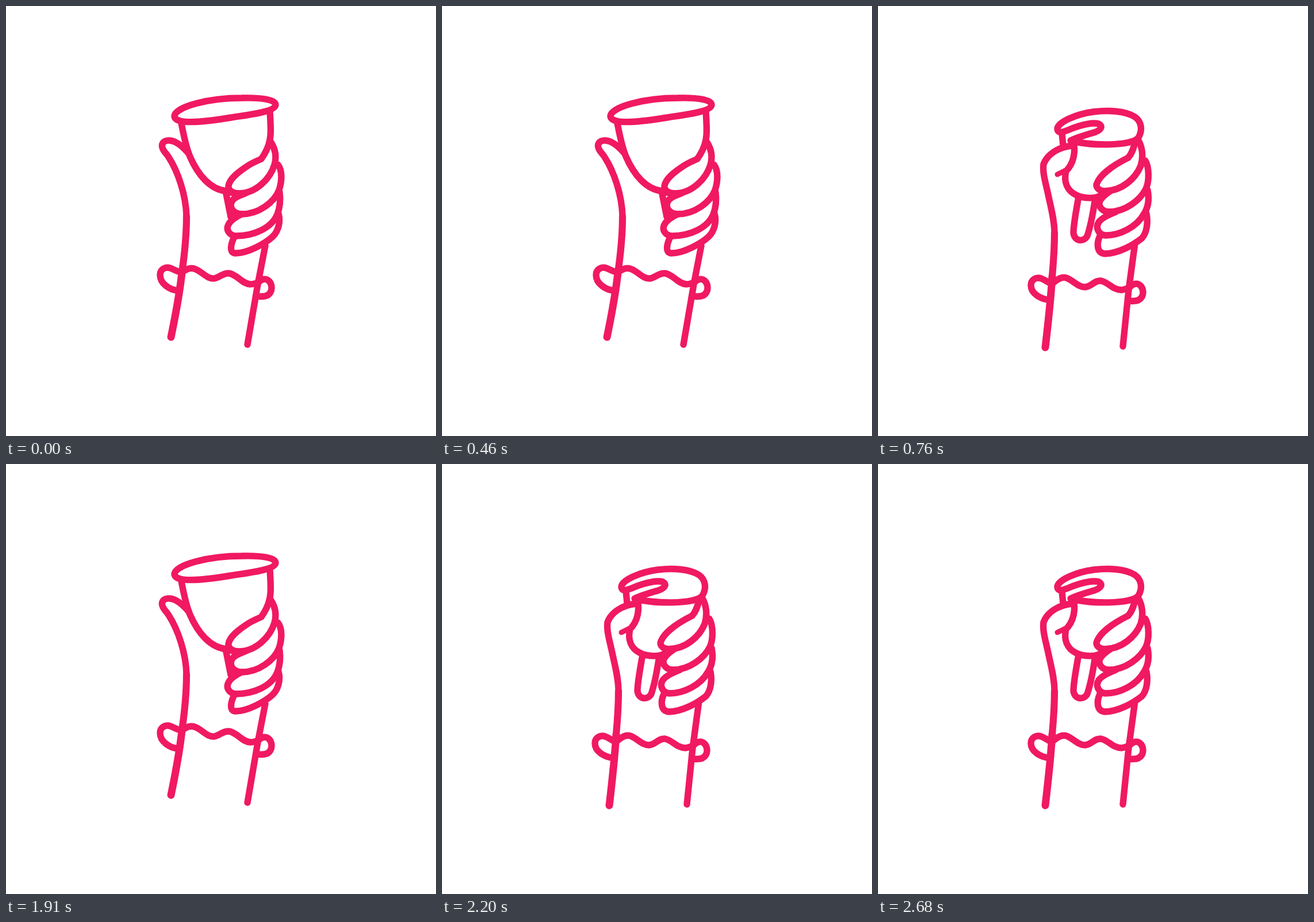
An HTML page for the animation above (3 s loop, 748 px wide and 748 px high).

```html
<!DOCTYPE html>
<html lang="en">
<head>
<meta charset="utf-8">
<title>Hand squeezing a cup</title>
<style>
  html, body { margin: 0; width: 100%; height: 100%; overflow: hidden; background: #fff; }
  svg { display: block; width: 100%; height: 100%; }
  g { fill: none; stroke: #f01962; stroke-width: 11.4; stroke-linecap: round; stroke-linejoin: round; }
  .arm { stroke-width: 12.2; }
  .wrist { stroke-width: 13; }
  .pose { animation: open 3s step-end infinite; }
  .squeeze { animation-name: squeeze; }
  @keyframes open {
    0%, 49.3333% { visibility: visible; }
    25.3333%, 73.3333%, 100% { visibility: hidden; }
  }
  @keyframes squeeze {
    0%, 49.3333% { visibility: hidden; }
    25.3333%, 73.3333%, 100% { visibility: visible; }
  }
</style>
</head>
<body>
<svg viewBox="0 0 748 748">
  <g class="pose open">
    <!-- cup -->
    <path d="M293 191C296 175 352 160 410 160C445 159 469 163 469 172C468 184 424 189 392 194C355 200 293 209 293 191Z"/>
    <path d="M305 204C309 225 313 245 320 262C334 294 355 319 383 322L404 328"/>
    <path d="M459 184C460 200 461 214 460 225C459 240 452 255 444 266"/>
    <path d="M382 322L391 367"/>
    <!-- thumb and arm -->
    <path d="M318 257C308 245 297 235 285 234C273 233 269 241 273 249C276 255 280 258 283 263C299 288 313 328 314 366"/>
    <path class="arm" d="M314 366C314 396 310 436 306 464"/>
    <path class="wrist" d="M306 464C302 500 293 547 287 576"/>
    <path d="M451 417L438 484L420 589"/>
    <!-- fingers -->
    <path d="M461 237C468 248 471 262 467 276C460 300 435 326 405 326C392 326 386 319 387 313C389 300 405 288 422 277C430 272 438 269 444 266"/>
    <path d="M473 276C481 286 480 305 475 320C467 341 440 362 410 362C398 362 391 354 391 346C392 337 398 334 404 331C410 328 414 327 418 325"/>
    <path d="M476 324C478 340 476 352 472 362C462 387 430 400 400 400C388 399 382 389 387 380C391 372 400 367 410 362"/>
    <path d="M474 361C478 375 474 392 463 402C452 412 420 431 398 430C388 429 391 414 397 402"/>
    <!-- cuff -->
    <path d="M299 495C285 494 268 483 268 468C268 458 277 453 286 456C294 459 299 463 306 463C315 457 322 454 330 458C342 463 350 475 362 474C372 472 377 464 388 465C402 467 410 483 425 484C432 484 436 482 440 480C444 475 452 473 457 478C463 483 463 493 460 498C456 505 448 506 440 505"/>
  </g>
  <g class="pose squeeze">
    <!-- cup -->
    <path d="M335 234C365 243 440 245 453 229C461 215 458 201 447 193C430 182 400 181 375 184C345 188 312 202 312 214C313 224 325 218 335 214C355 206 375 202 384 205C392 209 388 216 376 220C362 224 345 229 335 234"/>
    <path d="M320 222L322 242"/>
    <path d="M327 287C323 305 328 321 345 329C360 336 380 335 388 329"/>
    <path d="M348 337C345 355 340 380 340 395C342 410 358 411 364 400C369 385 374 360 377 340"/>
    <path d="M448 234C444 250 441 258 435 264"/>
    <!-- thumb and arm -->
    <path d="M341 241C343 258 340 272 330 284"/>
    <path stroke-width="9" d="M312 293L330 284"/>
    <path d="M338 243C315 245 295 257 288 275C286 290 291 305 296 328C301 352 307 372 307 395"/>
    <path class="arm" d="M307 395C307 425 305 448 303 470"/>
    <path class="wrist" d="M303 470C301 508 296 551 291 594"/>
    <path d="M447 413L436 494L426 592"/>
    <!-- fingers -->
    <path d="M452 232C460 245 462 262 457 278C448 300 425 321 395 322C383 322 378 314 381 308C386 295 405 279 435 264"/>
    <path d="M465 269C472 281 472 305 466 318C456 338 430 358 402 358C390 358 384 349 385 342C387 334 395 328 404 322"/>
    <path d="M469 320C472 335 470 350 463 361C450 385 420 399 396 399C383 398 378 385 384 376C390 368 402 363 414 358"/>
    <path d="M467 361C470 376 468 394 459 404C445 415 420 430 395 431C380 430 380 413 386 400"/>
    <!-- cuff -->
    <path d="M297 511C283 510 266 500 266 486C266 476 275 471 284 474C292 477 297 482 303 483C312 475 320 470 328 473C342 479 348 489 360 489C372 488 376 477 388 478C400 480 408 494 424 494C430 493 434 491 438 489C443 483 451 481 456 486C462 491 462 501 459 506C455 513 447 514 438 513"/>
  </g>
</svg>
</body>
</html>
```
